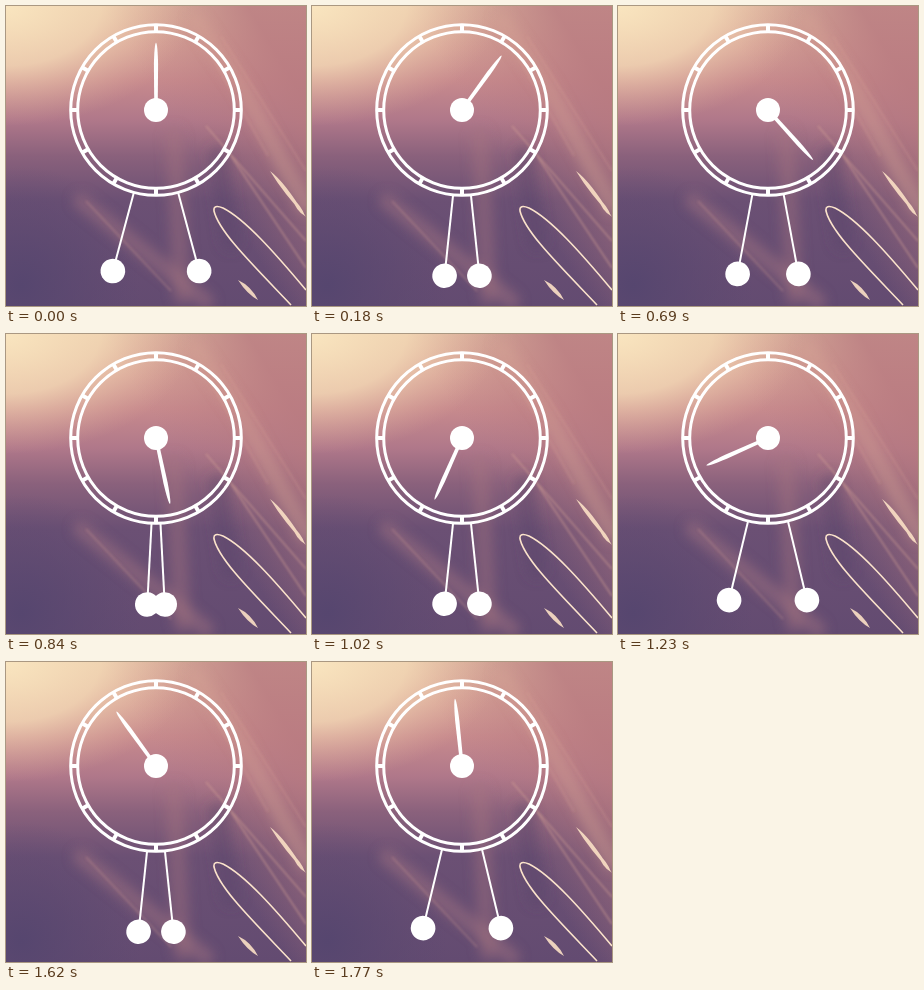
Write an HTML page that moves like this. It is 300 by 300 pixels and loops after 1800 ms.

```html
<!DOCTYPE html>
<html lang="en">
<head>
<meta charset="utf-8">
<title>Pendulum clock</title>
<style>
  html, body { margin: 0; width: 100%; height: 100%; overflow: hidden; background: #6d4c6b; }
  svg { display: block; width: 100vw; height: 100vh; }
</style>
</head>
<body>
<svg viewBox="0 0 300 300">
  <defs>
    <linearGradient id="sky" x1="0" y1="0" x2="0" y2="1">
      <stop offset="0" stop-color="#e6c4a6"/>
      <stop offset="0.12" stop-color="#d8a598"/>
      <stop offset="0.25" stop-color="#c78a8d"/>
      <stop offset="0.38" stop-color="#b0788a"/>
      <stop offset="0.5" stop-color="#8a617c"/>
      <stop offset="0.65" stop-color="#6b5074"/>
      <stop offset="1" stop-color="#634b71"/>
    </linearGradient>
    <radialGradient id="sun" gradientUnits="userSpaceOnUse" cx="0" cy="0" r="150" gradientTransform="scale(1.25 0.8)">
      <stop offset="0" stop-color="#f9e5bf"/>
      <stop offset="0.5" stop-color="#f3d8b5" stop-opacity="0.8"/>
      <stop offset="1" stop-color="#e0ae9c" stop-opacity="0"/>
    </radialGradient>
    <radialGradient id="dusk" gradientUnits="userSpaceOnUse" cx="15" cy="280" r="120">
      <stop offset="0" stop-color="#56466f"/>
      <stop offset="1" stop-color="#5a4870" stop-opacity="0"/>
    </radialGradient>
    <linearGradient id="rose" gradientUnits="userSpaceOnUse" x1="195" y1="160" x2="300" y2="95">
      <stop offset="0" stop-color="#b87a80" stop-opacity="0"/>
      <stop offset="1" stop-color="#b87a80" stop-opacity="0.85"/>
    </linearGradient>
    <filter id="soft" x="-30%" y="-30%" width="160%" height="160%"><feGaussianBlur stdDeviation="6"/></filter>
    <filter id="haze" x="-30%" y="-30%" width="160%" height="160%"><feGaussianBlur stdDeviation="1.2"/></filter>
  </defs>

  <g>
    <rect width="300" height="300" fill="url(#sky)"/>
    <rect width="300" height="300" fill="url(#rose)"/>
    <rect width="300" height="300" fill="url(#sun)"/>
    <rect width="300" height="300" fill="url(#dusk)"/>
    <g fill="none" stroke-linecap="round" filter="url(#soft)">
      <path d="M75 195L200 295" stroke="#a87884" stroke-width="16" opacity="0.45"/>
      <path d="M168 130L176 290" stroke="#a87580" stroke-width="18" opacity="0.4"/>
      <path d="M190 15L235 80L300 200" stroke="#d8a597" stroke-width="16" opacity="0.4"/>
      <path d="M212 150L225 235" stroke="#5c456c" stroke-width="20" opacity="0.45"/>
    </g>
    <g fill="none" stroke="#d9a598" filter="url(#haze)">
      <path d="M200 40L262 150M215 30L300 165M80 195L165 285" stroke-width="2" opacity="0.25"/>
      <path d="M200 120L300 235M225 150L300 262" stroke-width="1.5" opacity="0.5"/>
    </g>
    <path d="M285 299C247 259 213 226 208 205Q207 198 217 202C239 213 269 247 300 284"
      fill="none" stroke="#fbe3cb" stroke-width="1.6"/>
    <path d="M264 165Q279 176 300 211Q278 188 264 165M286 192Q295 199 299 210Q290 205 286 192M232 274Q245 280 252 294Q241 288 232 274"
      fill="#fbe0c6" opacity="0.9"/>
  </g>

  <g transform="translate(150 104)" fill="#fff" stroke="#fff" stroke-width="0">
    <g fill="none" stroke-width="3">
      <circle r="85.3"/>
      <circle r="78.3"/>
    </g>
    <g id="ticks" stroke-width="4"></g>
    <path id="hand" d="M0 -67.5Q1.6 -66 2.1 -46L1.7 0H-1.7L-2.1 -46Q-1.6 -66 0 -67.5Z"/>
    <circle r="12"/>
    <g class="pendulum"><path d="M0 85V160" stroke-width="2"/><circle cy="166.7" r="12.3"/></g>
    <g class="pendulum"><path d="M0 85V160" stroke-width="2"/><circle cy="166.7" r="12.3"/></g>
  </g>
</svg>
<script>
  const STEP = 30, STEPS = 60, SWING = 15, HALF = 20;
  const hand = document.getElementById('hand');
  const pendulums = document.querySelectorAll('.pendulum');
  const turn = (el, deg) => el.setAttribute('transform', `rotate(${deg})`);

  document.getElementById('ticks').innerHTML = Array.from({ length: 12 }, (_, i) =>
    `<path d="M0 -78V-85" transform="rotate(${i * 30})"/>`).join('');

  function draw(ms) {
    const step = Math.floor(ms / STEP) % STEPS;
    turn(hand, step * 360 / STEPS);
    // Constant-speed swing; the two rods mirror each other.
    const phase = step % (2 * HALF);
    const angle = SWING * (2 * Math.abs(phase - HALF) / HALF - 1);
    turn(pendulums[0], angle);
    turn(pendulums[1], -angle);
  }

  const start = performance.now();
  function loop() {
    draw(performance.now() - start);
    requestAnimationFrame(loop);
  }
  loop();
</script>
</body>
</html>
```
